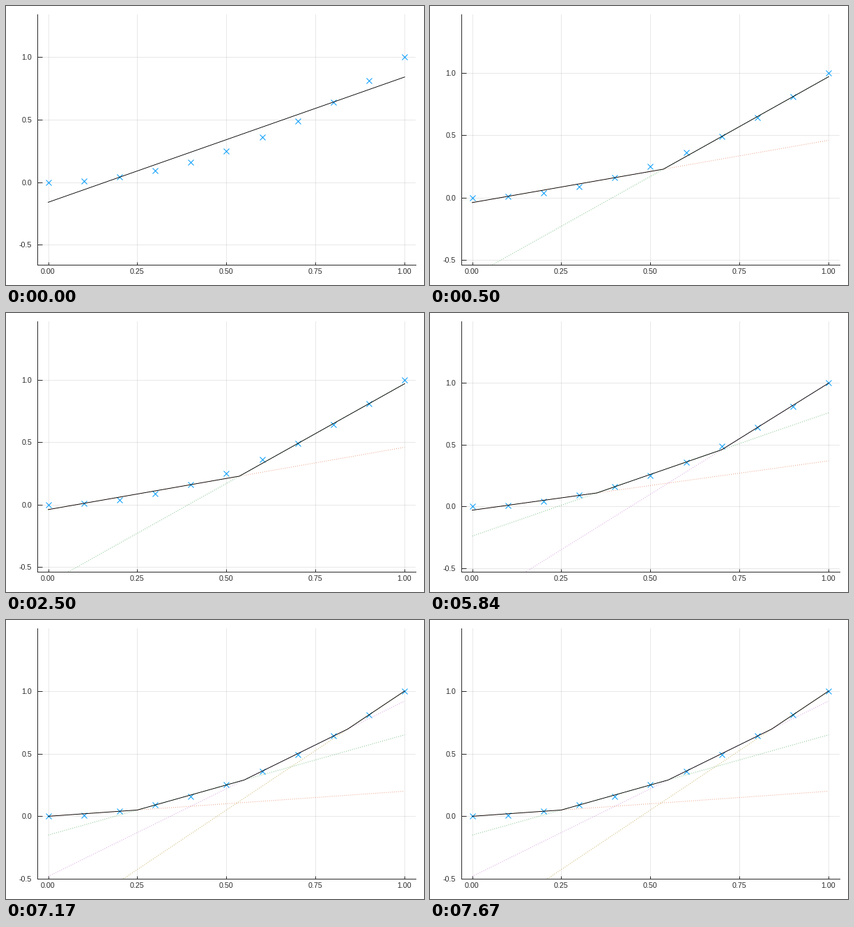
Recreate the animation shown at these times as a matplotlib script. Size 600x400 px, loop 8000 ms.

```python
import numpy as np
import matplotlib.pyplot as plt
from matplotlib.animation import FuncAnimation

STEP = 20              # ms per frame
LOOP = 8000
START = 490            # ms of the first refinement
PERIOD = 10000 / 3     # ms between refinements
PX = 0.72              # one pixel in points at 100 dpi
INK = "#2b2b2b"
COLORS = ["#e36f47", "#3ea44e", "#c371d2", "#ac8e18"]

plt.rcParams["font.family"] = "Liberation Sans"
fig = plt.figure(figsize=(6, 4), dpi=100, facecolor="white")
ax = fig.add_axes([45.2 / 600, 28.8 / 400, 542.4 / 600, 359.2 / 400])
ax.set_xlim(-0.03, 1.03)
ax.set_xticks(np.linspace(0, 1, 5))
ax.set_yticks(np.linspace(-0.5, 1, 4))
ax.tick_params(direction="in", width=PX, color=INK,
               labelleft=False, labelbottom=False)
ax.tick_params(axis="x", length=4.3 * PX)
ax.tick_params(axis="y", length=6.5 * PX)
ax.grid(color="black", alpha=0.09, linewidth=PX)
ax.set_axisbelow(True)
ax.spines[["top", "right"]].set_visible(False)
for side in ("left", "bottom"):
    ax.spines[side].set(linewidth=PX, color=INK)


def label(text, at, coords, shift, align):
    ax.annotate(text, at, xycoords=coords, textcoords="offset points",
                xytext=(shift[0] * PX, shift[1] * PX), ha=align,
                va="baseline", fontsize=10.67 * PX, color=INK)


for v in ax.get_xticks():
    label(f"{v:.2f}", (v, 0), ("data", "axes fraction"), (-11, -13), "left")
for v in ax.get_yticks():
    label(f"{v:.1f}", (0, v), ("axes fraction", "data"), (-8, -4), "right")

samples = np.linspace(0, 1, 11)
ax.plot(samples, samples ** 2, "x", color="#009afa",
        markersize=8 * PX, markeredgewidth=PX, zorder=3)
pieces = [ax.plot([], [], color=c, alpha=0.65, linewidth=PX,
                  linestyle=(0, (1, 2)), dash_capstyle="butt", zorder=4)[0]
          for c in COLORS]
hull, = ax.plot([], [], color="black", linewidth=0.9 * PX, zorder=5)


def secant(group):
    """Least absolute error line: it cuts x² a quarter in from each end."""
    size = len(group)
    at = group[0] + size * np.array([0.25, 0.75]) - 0.5
    at = 4 + 0.98 * (at - 4)   # settles ties
    p, q = samples[np.round(at).astype(int)]
    return -p * q, p + q


def fit(n):
    return [secant(g) for g in np.array_split(np.arange(len(samples)), n)]


def kinks(lines):
    """Crossings of neighbouring pieces, with both ends of the range."""
    inner = [(a - c) / (d - b) for (a, b), (c, d) in zip(lines, lines[1:])]
    return np.array([0, *inner, 1])


def draw(i):
    n = 2 + int((i * STEP - START) // PERIOD)
    lines = fit(n)
    for k, piece in enumerate(pieces):
        piece.set_visible(1 < n and k < n)
        if k < n:
            a, b = lines[k]
            piece.set_data([0, 1], [a, a + b])
    x = kinks(lines)
    y = np.max([a + b * x for a, b in lines], axis=0)
    hull.set_data(x, y)
    ax.set_ylim(y.min() - 0.5, y.max() + 0.5)
    return [hull, *pieces]


anim = FuncAnimation(fig, draw, frames=LOOP // STEP, interval=STEP,
                     repeat=True, repeat_delay=0, blit=False)
plt.show()
```
